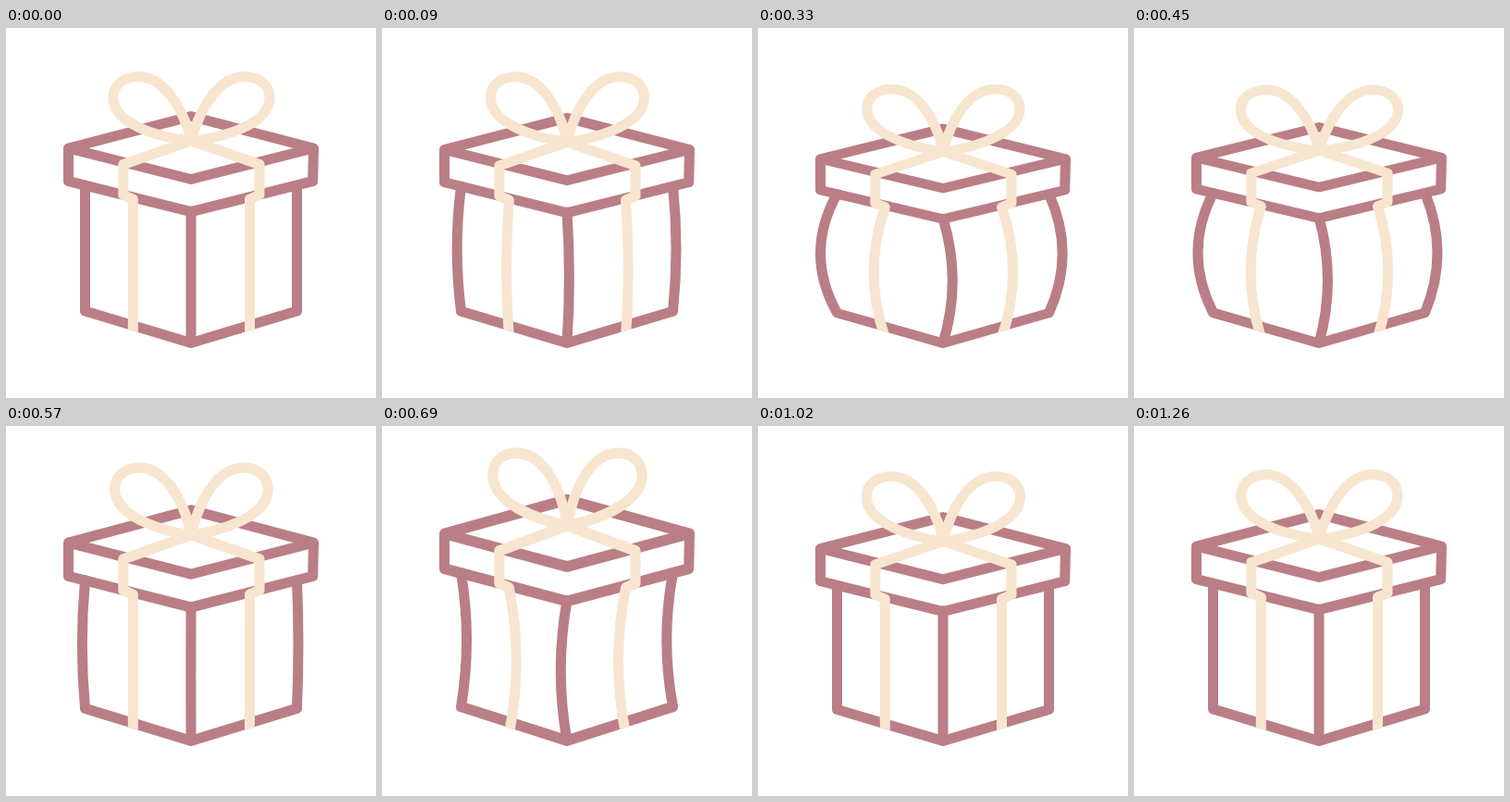
Animation of 400 by 400 pixels, one loop 3320 ms. Source, as an HTML page with a canvas:

```html
<!DOCTYPE html>
<html lang="en">
<head>
<meta charset="utf-8">
<title>Bouncing gift</title>
<style>
html, body { margin: 0; width: 100%; height: 100%; overflow: hidden; background: #fff; }
canvas { display: block; width: 100vmin; height: 100vmin; }
</style>
</head>
<body>
<canvas id="stage"></canvas>
<script>
const LOOP = 3320, STEP = 30, FLOOR = 346, AXIS = 200.4;
const ROSE = '#ba7e86', CREAM = '#f8e5cf';

// time, vertical scale, side bulge, inner bulge, bow tilt
const KEYS = [
  [0, 1, 0, 0, 0],
  [210, 0.974, 14, 8.5, 0.08],
  [345, 0.946, 18, 11.5, 0.035],
  [450, 0.953, 16.5, 10.5, -0.01],
  [690, 1.063, -6, -7.5, 0.08],
  [870, 1.001, -1, -1.8, 0.04],
  [960, 0.986, 0, 0, 0.035],
  [1020, 0.988, 0, 0, 0.03],
  [1260, 1, 0, 0, 0]
];

const canvas = document.getElementById('stage');
const ctx = canvas.getContext('2d');
const size = Math.round(Math.min(innerWidth, innerHeight) * devicePixelRatio) || 400;
canvas.width = canvas.height = size;

// Tangent at key i; flat at the ends and at turning points
function slope(i, k) {
  const p = KEYS[i - 1], q = KEYS[i], r = KEYS[i + 1];
  if (!p || !r || (q[k] - p[k]) * (r[k] - q[k]) <= 0) return 0;
  return (r[k] - p[k]) / (r[0] - p[0]);
}

function valueAt(t, k) {
  const last = KEYS.length - 1;
  if (t >= KEYS[last][0]) return KEYS[last][k];
  let i = 0;
  while (t >= KEYS[i + 1][0]) i++;
  const a = KEYS[i], b = KEYS[i + 1], d = b[0] - a[0], x = (t - a[0]) / d, y = 1 - x;
  return a[k] * y * y * (1 + 2 * x) + b[k] * x * x * (3 - 2 * x)
    + d * x * y * (y * slope(i, k) - x * slope(i + 1, k));
}

function stroke(color, path, cap = 'round') {
  ctx.strokeStyle = color;
  ctx.lineCap = cap;
  ctx.stroke(new Path2D(path));
}

// Upright edge whose middle is pushed sideways by `push`
const edge = (x, top, bottom, push) =>
  `M${x} ${top}Q${x + 2 * push} ${(top + bottom) / 2} ${x} ${bottom}`;

function mirrored(draw) {
  for (const side of [1, -1]) {
    ctx.save();
    ctx.translate(AXIS, 0);
    ctx.scale(side, 1);
    ctx.translate(-AXIS, 0);
    draw();
    ctx.restore();
  }
}

function draw(t) {
  const [scale, bulge, inner, tilt] = [1, 2, 3, 4].map(k => valueAt(t, k));
  ctx.setTransform(size / 400, 0, 0, size / 400, 0, 0);
  ctx.fillStyle = '#fff';
  ctx.fillRect(0, 0, 400, 400);
  ctx.translate(0, FLOOR);
  ctx.scale(1, scale);
  ctx.translate(0, -FLOOR);
  ctx.lineWidth = 11;
  ctx.lineJoin = 'round';

  // Box
  stroke(ROSE, edge(85.5, 170, 306, -bulge) + 'L200 340.5L314.5 306'
    + edge(314.5, 170, 306, (bulge + inner) / 2) + edge(200, 198, 340.5, inner * 0.9));

  // Lid
  stroke(ROSE, 'M67.5 130L200 95.5L332.5 130L200 163.5Z'
    + 'M67.5 130V165.6L200 198.7L331.7 165.6L332.5 130');

  // Ribbon and bow
  mirrored(() => {
    ctx.save();
    ctx.beginPath();
    ctx.moveTo(90, 100);
    ctx.lineTo(200, 100);
    ctx.lineTo(200, 346.5);
    ctx.lineTo(90, 313);
    ctx.clip();
    stroke(CREAM, edge(137.3, 185, 334, -inner * 1.06), 'butt');
    ctx.restore();
    stroke(CREAM, 'M200 122L126.8 147.5V180.5L137.3 185');
    ctx.translate(200, 122);
    ctx.rotate(tilt);
    ctx.translate(-200, -122);
    stroke(CREAM, 'M200 119C190 85 170 52.5 143 52.5C127 52.5 115.8 62 115.8 75'
      + 'C115.8 99 150 116 200 122');
  });
}

function frame() {
  const t = performance.now() % LOOP;
  draw(Math.floor(t / STEP) * STEP);
  requestAnimationFrame(frame);
}
frame();
</script>
</body>
</html>
```
